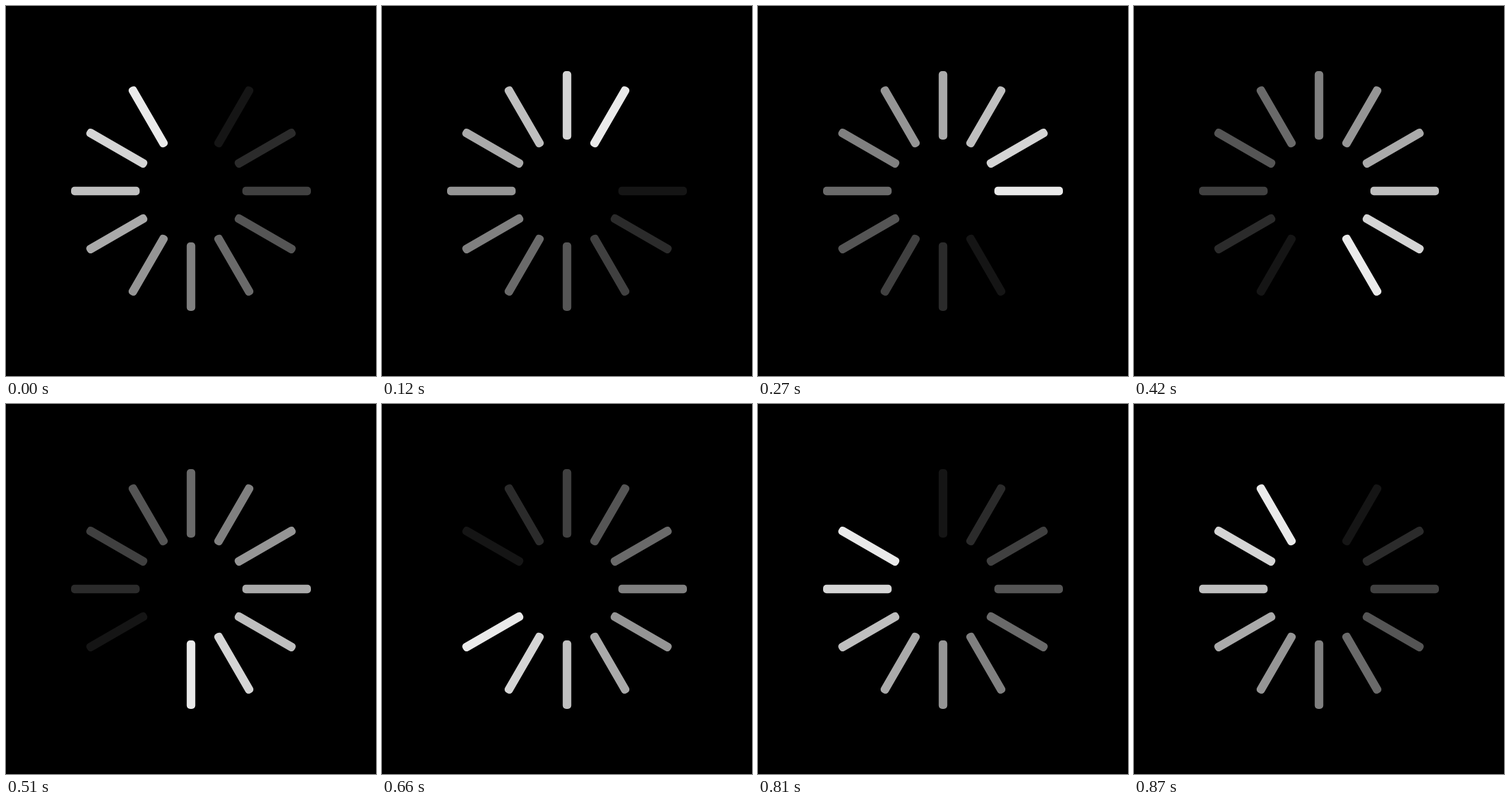
Recreate the animation shown at these times as an HTML page. Size 540x540 px, loop 930 ms.

```html
<!DOCTYPE html>
<html lang="en">
<head>
<meta charset="utf-8">
<title>Spinner</title>
<style>
  html, body { margin: 0; width: 100%; height: 100%; overflow: hidden; background: #000; }
  svg { display: block; width: 100vw; height: 100vh; }
</style>
</head>
<body>
<svg id="spinner" viewBox="0 0 540 540"></svg>
<script>
  const BARS = 12;
  const LOOP = 930;
  // Times in ms at which the bright bar moves on by one place
  const STEPS = [60, 120, 210, 270, 360, 420, 510, 570, 660, 720, 810, 870];

  const spinner = document.getElementById('spinner');

  const bars = Array.from({ length: BARS }, (_, i) => {
    const bar = document.createElementNS('http://www.w3.org/2000/svg', 'rect');
    const attrs = {
      x: 263.75, y: 95, width: 12.5, height: 100, rx: 5,
      transform: `rotate(${i * 360 / BARS} 270 270)`
    };
    for (const name in attrs) bar.setAttribute(name, attrs[name]);
    return spinner.appendChild(bar);
  });

  let shown = -1;

  function draw(time) {
    const step = STEPS.filter(t => t <= time).length % BARS;
    if (step === shown) return;
    shown = step;
    bars.forEach((bar, i) => {
      const level = (i - step + BARS) % BARS;
      const grey = Math.round(255 * level / BARS);
      bar.setAttribute('fill', `rgb(${grey},${grey},${grey})`);
    });
  }

  const start = performance.now();

  function tick() {
    draw((performance.now() - start) % LOOP);
    requestAnimationFrame(tick);
  }

  tick();
</script>
</body>
</html>
```
